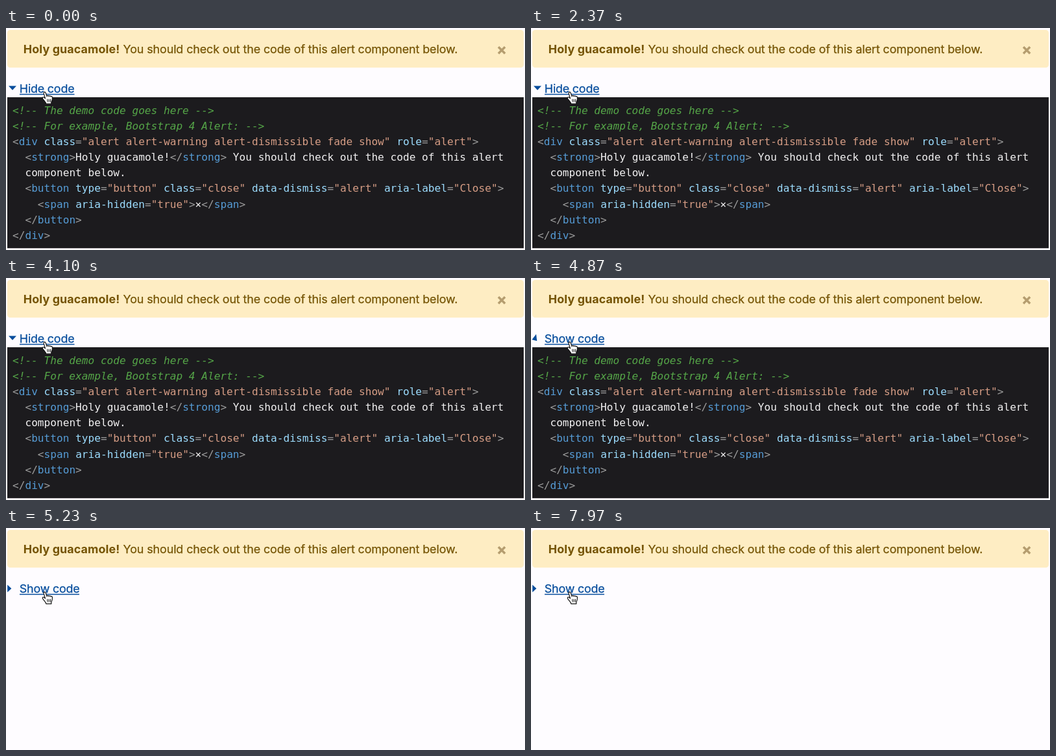
Write an HTML page that moves like this. It is 800 px wide and 343 px high and loops after 8000 ms.

```html
<!DOCTYPE html>
<html lang="en">
<head>
<meta charset="utf-8">
<title>Show and hide code</title>
<style>
html, body { margin: 0; width: 100%; height: 100%; overflow: hidden; background: #fefcff; }
svg { display: block; width: 800px; height: 343px; }
.ui { font: 17.9px Inter, "Open Sans", sans-serif; letter-spacing: -.2px; stroke-width: .25; }
.alert { fill: #755404; stroke: #755404; letter-spacing: -.11px; }
.strong { font-weight: 700; letter-spacing: .1px; stroke: none; }
.link { fill: #054c9c; stroke: #054c9c; }
#caret { stroke: none; }
#code text { font: 16.14px "DejaVu Sans Mono", "Liberation Mono", monospace; white-space: pre; }
.c { fill: #55a648; font-style: italic; }
.p { fill: #9b9b9b; }
.t { fill: #569cd6; }
.a { fill: #9cdcfe; }
.s { fill: #d69d85; }
.w { fill: #f1f0f1; }
</style>
</head>
<body>
<svg viewBox="0 0 800 343">
  <defs><clipPath id="clip"><rect id="mask" x="2" y="107" width="796" height="233.5"/></clipPath></defs>
  <rect x="2" y="3" width="796" height="58.3" rx="4.6" fill="#feedc3"/>
  <text class="ui alert strong" x="26.8" y="39.3">Holy guacamole!</text>
  <text class="ui alert" x="180.6" y="39.3">You should check out the code of this alert component below.</text>
  <path d="M759 29.2l10.2 10.2M769.2 29.2L759 39.4" stroke="#b59d6f" stroke-width="3.5"/>
  <path id="caret" class="link"/>
  <text id="label" class="ui link" x="20.8" y="100"></text>
  <path id="line" class="link" stroke-width="1.5"/>
  <g clip-path="url(#clip)">
    <rect x="2" y="107" width="796" height="233.5" fill="#1c1b1e"/>
    <g id="code"></g>
  </g>
  <g transform="translate(-.7 0)" stroke="#111" stroke-width="1.2" stroke-linejoin="round" stroke-linecap="round">
    <path fill="#fff" d="M62.6 117.2C62.4 114.6 59.6 112.4 57.4 109.3C56.2 107.3 58.2 106.1 59.6 107.3L61.2 108.8L58.9 101.2C58.3 98.6 61 97.9 61.9 100.3L63.7 105.6C64.3 104 66.4 104 66.9 105.6C67.6 104.3 69.3 104.5 69.7 106C70.9 105.1 72.2 105.9 72.2 107.4C72.4 110.6 71.6 112.3 70.6 114.3L70.5 117.2Z"/>
    <path fill="none" stroke-width="1" d="M64.4 110.2l.3 3.8M66.8 110.2l.1 3.8M69.2 110.2l-.1 3.8"/>
  </g>
</svg>
<script>
const $ = id => document.getElementById(id);
const NS = "http://www.w3.org/2000/svg";
const LOOP = 8000, CHAR = 9.717, ROW = 24.15;

// Each row: indent in characters, then class and text pairs.
const rows = [
  [0, "c", "<!-- The demo code goes here -->"],
  [0, "c", "<!-- For example, Bootstrap 4 Alert: -->"],
  [0, "p", "<", "t", "div", "a", " class", "p", "=", "s", '"alert alert-warning alert-dismissible fade show"',
    "a", " role", "p", "=", "s", '"alert"', "p", ">"],
  [2, "p", "<", "t", "strong", "p", ">", "w", "Holy guacamole!", "p", "</", "t", "strong", "p", ">",
    "w", " You should check out the code of this alert"],
  [2, "w", "component below."],
  [2, "p", "<", "t", "button", "a", " type", "p", "=", "s", '"button"', "a", " class", "p", "=", "s", '"close"',
    "a", " data-dismiss", "p", "=", "s", '"alert"', "a", " aria-label", "p", "=", "s", '"Close"', "p", ">"],
  [4, "p", "<", "t", "span", "a", " aria-hidden", "p", "=", "s", '"true"', "p", ">", "w", "×",
    "p", "</", "t", "span", "p", ">"],
  [2, "p", "</", "t", "button", "p", ">"],
  [0, "p", "</", "t", "div", "p", ">"]
];

function add(parent, tag, attrs, text = "") {
  const el = document.createElementNS(NS, tag);
  for (const key in attrs) el.setAttribute(key, attrs[key]);
  el.textContent = text;
  return parent.appendChild(el);
}

rows.forEach(([indent, ...parts], i) => {
  const row = add($("code"), "text", { x: 10 + indent * CHAR, y: 132.6 + i * ROW });
  for (let k = 0; k < parts.length; k += 2) add(row, "tspan", { class: parts[k] }, parts[k + 1]);
});

const DOWN = "M4 89.4H16L10 96Z";
const TURN = "M8 86.8L1.4 95.2L9.2 97.2Z";
const RIGHT = "M2.2 87.8V99.2L8.4 93.5Z";

// Start time, label, underline end, caret, panel height.
const steps = [
  [0, "Hide code", 105.5, DOWN, 233.5],
  [4870, "Show code", 113, TURN, 233.5],
  [4900, "Show code", 113, RIGHT, 49.5],
  [4930, "Show code", 113, RIGHT, 18],
  [4970, "Show code", 113, RIGHT, 4],
  [5000, "Show code", 113, RIGHT, 0]
];

let shown;
function draw(time) {
  const step = steps.findLast(s => s[0] <= time);
  if (step === shown) return;
  shown = step;
  const [, label, end, caret, height] = step;
  $("label").textContent = label;
  $("line").setAttribute("d", `M21 102.6H${end}`);
  $("caret").setAttribute("d", caret);
  $("mask").setAttribute("height", height);
}

const start = performance.now();
function tick() {
  draw((performance.now() - start) % LOOP);
  requestAnimationFrame(tick);
}
tick();
</script>
</body>
</html>
```
